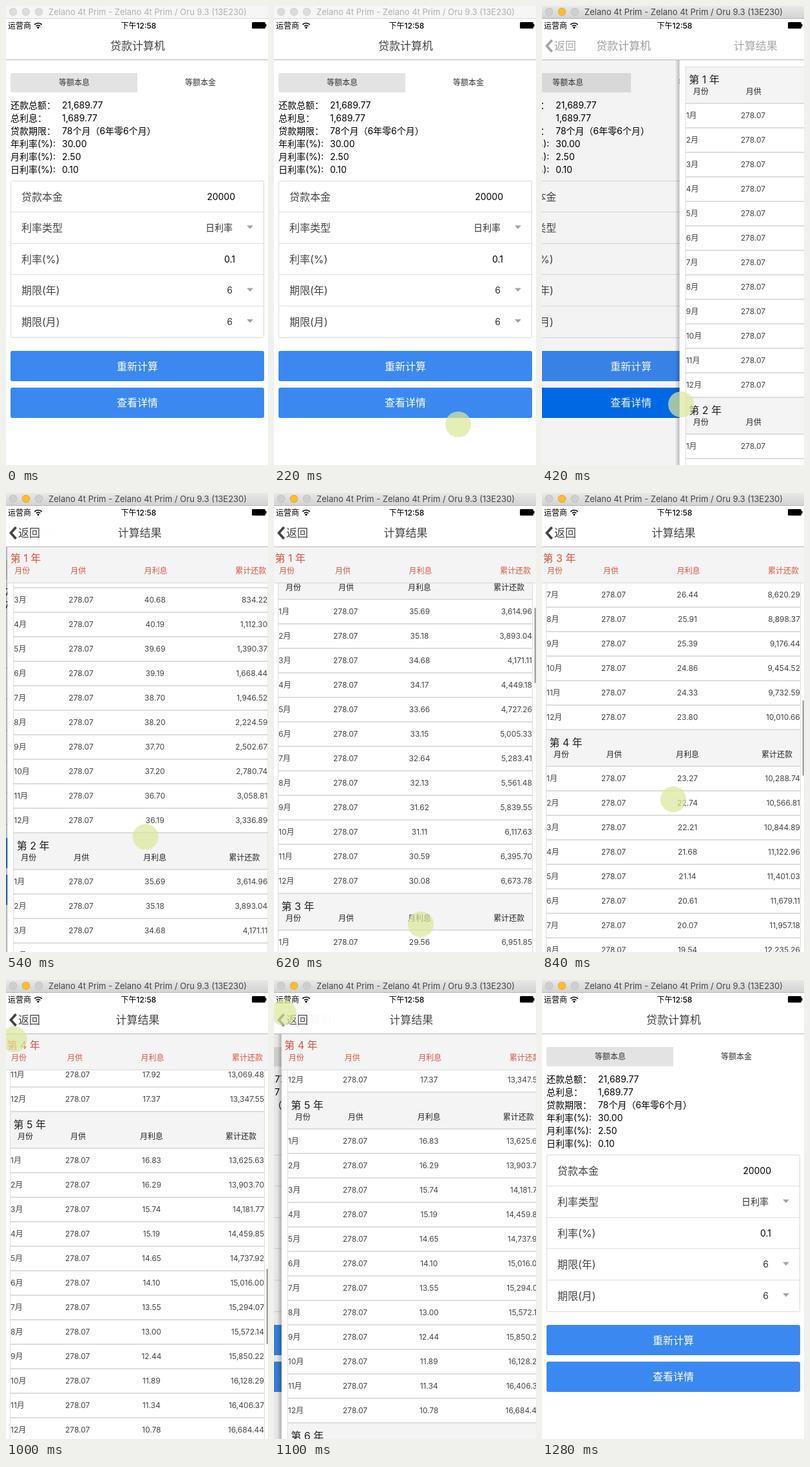
These frames come from a looping animation (407x712 px, 1.3 s). An HTML page with a canvas:

```html
<!DOCTYPE html>
<html lang="zh-CN">
<head>
<meta charset="utf-8">
<title>贷款计算机</title>
<style>
html, body { margin: 0; width: 100%; height: 100%; overflow: hidden; background: #fff; }
canvas { display: block; }
</style>
</head>
<body>
<canvas id="stage" width="407" height="712"></canvas>
<script>
const ctx = document.getElementById('stage').getContext('2d');
const W = 407, H = 712, LOOP = 1300, STEP = 20;
const FONT = 'Inter, "Noto Sans CJK SC", "Noto Sans CJK JP", sans-serif';

// The phone is 414 wide and starts 3px left of the stage.
const PHONE_X = -3, PHONE_W = 414, NAV_BOTTOM = 84;
const LIST_TOP = 94, HEAD_H = 57, ROW_H = 38, YEAR_H = HEAD_H + 12 * ROW_H;
const INK = '#444', LINE = '#ddd', RED = '#df5340';

const MONTHS = 78, RATE = 0.025 / 12;
const payment = 20000 * RATE / (1 - (1 + RATE) ** -MONTHS);
const interest = n => payment * (1 - (1 + RATE) ** (n - 1 - MONTHS));
const money = v => v.toFixed(2).replace(/\B(?=(\d{3})+\.)/g, ',');

// Tracks are lists of [time, value, ...].
const SCROLL = [[510, 0], [540, 80], [580, 310], [620, 499], [650, 600], [690, 850],
  [720, 1000], [760, 1098], [800, 1162], [840, 1266], [880, 1500], [920, 1720],
  [960, 1865], [1000, 1942], [1040, 1966], [1080, 1972]];
const CURSOR = [[40, 430, 735], [200, 300, 655], [320, 217, 619], [420, 216, 618],
  [500, 222, 640], [560, 214, 480], [620, 228, 669], [690, 212, 500], [740, 215, 638],
  [760, 215, 638], [800, 211, 577], [840, 204, 475], [880, 170, 340], [940, 75, 180],
  [1000, 13, 92], [1040, 18, 64], [1090, 17, 60], [1130, 8, 22], [1180, -25, -25]];

function sample(track, t) {
  const last = track[track.length - 1];
  if (t <= track[0][0]) return track[0].slice(1);
  if (t >= last[0]) return last.slice(1);
  const i = track.findIndex(k => k[0] > t), a = track[i - 1], b = track[i];
  const u = (t - a[0]) / (b[0] - a[0]);
  return a.slice(1).map((v, j) => v + (b[j + 1] - v) * u);
}

function settle(ms) {
  const curve = x => 1 - Math.exp(-x * 0.029) * (1 + x * 0.029);
  return curve(Math.max(0, Math.min(190, ms))) / curve(190);
}

function rect(x, y, w, h, color, radius = 0) {
  ctx.fillStyle = color;
  ctx.beginPath();
  ctx.roundRect(x, y, w, h, radius);
  ctx.fill();
}

function disc(x, y, r, color) {
  ctx.fillStyle = color;
  ctx.beginPath();
  ctx.arc(x, y, r, 0, 2 * Math.PI);
  ctx.fill();
}

// y is the middle of the glyphs.
function text(str, x, y, size, color = INK, align = 'left', weight = 400) {
  ctx.font = `${weight} ${size}px ${FONT}`;
  ctx.fillStyle = color;
  ctx.textAlign = align;
  ctx.fillText(str, x, y + size * 0.37);
}

function layer(alpha, dx, draw) {
  ctx.save();
  ctx.globalAlpha = alpha;
  ctx.translate(dx, 0);
  draw();
  ctx.restore();
}

function drawWindowBar(active) {
  const bar = ctx.createLinearGradient(0, 0, 0, 20);
  bar.addColorStop(0, active ? '#e8e8e8' : '#f6f6f6');
  bar.addColorStop(1, active ? '#d2d2d2' : '#f6f6f6');
  rect(0, 0, W, 20, bar);
  rect(0, 19, W, 1, active ? '#b8b8b8' : '#dadada');
  [11, 31, 51].forEach((x, i) => {
    const lit = active && i === 1;
    disc(x, 9, 6.2, lit ? '#e0a12c' : active ? '#bdbdbd' : '#d0d0d0');
    disc(x, 9, 5.5, lit ? '#fdbc2f' : active ? '#cfcfcf' : '#dcdcdc');
  });
  text('Zelano 4t Prim - Zelano 4t Prim / Oru 9.3 (13E230)', 66, 9.5, 13,
    active ? '#444' : '#b0b0b0');
}

function drawStatusBar() {
  rect(0, 20, W, 22, '#fff');
  text('运营商', 3, 30.5, 12, '#000');
  text('下午12:58', 206, 30.5, 12, '#000', 'center', 500);
  ctx.strokeStyle = '#000';
  ctx.lineWidth = 1.7;
  for (const r of [4.5, 8]) {
    ctx.beginPath();
    ctx.arc(50, 34.5, r, -Math.PI * 0.75, -Math.PI * 0.25);
    ctx.stroke();
  }
  disc(50, 33.5, 1.6, '#000');
  rect(382, 25, 21, 10, '#000', 1.5);
  rect(403, 28, 1.5, 4, '#000');
}

function drawNav(p) {
  rect(0, 42, W, 42, '#fff');
  layer(1 - p, -163 * p, () => text('贷款计算机', 204.5, 62, 17, INK, 'center'));
  layer(p, 243 * (1 - p), () => text('计算结果', 204.5, 62, 17, INK, 'center'));
  layer(p, 0, () => {
    ctx.strokeStyle = INK;
    ctx.lineWidth = 3.8;
    ctx.beginPath();
    ctx.moveTo(15.5, 53);
    ctx.lineTo(7.5, 62);
    ctx.lineTo(15.5, 71);
    ctx.stroke();
    text('返回', 19, 62, 17);
  });
  rect(0, 83, W, 1, '#b4b4b4');
}

function drawForm(pressed) {
  rect(PHONE_X, NAV_BOTTOM, PHONE_W, H, '#fff');
  rect(7, 104, 197, 30, '#e3e3e3', [3, 0, 0, 3]);
  text('等额本息', 106, 119, 12, '#333', 'center');
  text('等额本金', 302, 119, 12, '#333', 'center');

  [['还款总额：', '21,689.77'], ['总利息：', '1,689.77'], ['贷款期限：', '78个月（6年零6个月）'],
    ['年利率(%):', '30.00'], ['月利率(%):', '2.50'], ['日利率(%):', '0.10']
  ].forEach(([label, value], i) => {
    text(label, 7, 154 + 20 * i, 14, '#000');
    text(value, 87, 154 + 20 * i, 14, '#000');
  });

  ctx.strokeStyle = '#dadada';
  ctx.lineWidth = 1;
  ctx.beginPath();
  ctx.roundRect(7.5, 271.5, 393, 243, 2);
  ctx.stroke();
  [['贷款本金', '20000'], ['利率类型', '日利率', true], ['利率(%)', '0.1'],
    ['期限(年)', '6', true], ['期限(月)', '6', true]
  ].forEach(([label, value, menu], i) => {
    const y = 296 + 48.5 * i;
    if (i) rect(8, Math.floor(y - 25), 392, 1, LINE);
    text(label, 24, y, 16);
    text(value, menu ? 352 : 356, y - 0.5, 14, menu ? '#333' : '#000', 'right');
    if (!menu) return;
    ctx.fillStyle = '#a3a3a3';
    ctx.beginPath();
    ctx.moveTo(374, y - 4);
    ctx.lineTo(384, y - 4);
    ctx.lineTo(379, y + 1.5);
    ctx.fill();
  });

  rect(7, 535, 394, 47, '#3b88f1', 3);
  text('重新计算', 204, 559, 16, '#fff', 'center');
  rect(7, 592, 394, 47, pressed ? '#006ded' : '#3b88f1', 3);
  text('查看详情', 204, 615, 16, '#fff', 'center');
}

function drawHeading(year, x, y, labelX, labelY, color) {
  text(`第 ${year} 年`, x, y, 16, color);
  ['月份', '月供', '月利息', '累计还款'].forEach((label, i) =>
    text(label, labelX[i], labelY, 12, color));
}

function drawYear(year, top) {
  const first = 12 * (year - 1) + 1;
  const count = Math.min(12, MONTHS - first + 1);
  const height = HEAD_H + count * ROW_H;
  if (top > H || top + height < NAV_BOTTOM) return;
  rect(6, top, 396, HEAD_H, '#f4f4f4');
  rect(6, top, 396, 1, LINE);
  drawHeading(year, 11.5, top + 20, [18, 100, 208, 341], top + 39, '#222');
  for (let i = 0; i < count; i++) {
    const n = first + i, y = top + HEAD_H + i * ROW_H;
    rect(6, y - 1, 396, 2, LINE);
    text(`${i + 1}月`, 7, y + 19, 12);
    text(money(payment), 92, y + 19, 12);
    text(money(interest(n)), 226, y + 19, 12, INK, 'center');
    text(money(payment * n), 401, y + 19, 12, INK, 'right');
  }
  rect(6, top + height - 1, 396, 2, LINE);
  rect(6, top, 1, height, LINE);
  rect(401, top, 1, height, LINE);
}

function drawResults(scroll, showBar) {
  rect(PHONE_X, NAV_BOTTOM, PHONE_W, H, '#fff');
  for (let year = 1; year <= 7; year++) {
    drawYear(year, LIST_TOP + (year - 1) * YEAR_H - Math.round(scroll));
  }
  if (scroll >= 10) {
    rect(PHONE_X, NAV_BOTTOM, PHONE_W, 55, '#f4f4f4');
    rect(PHONE_X, 139, PHONE_W, 1, '#d6d6d6');
    const year = 1 + Math.floor((scroll - 10) / YEAR_H);
    drawHeading(year, 1.5, 101.5, [8, 95, 209.5, 351], 121, RED);
  }
  if (showBar) rect(404.5, 84.8 + 0.187 * scroll, 2.5, 117, '#a4a4a4', 1.2);
}

function drawPages(t, p) {
  const [scroll] = sample(SCROLL, t);
  const x = (1 - p) * PHONE_W;
  ctx.save();
  ctx.beginPath();
  ctx.rect(0, NAV_BOTTOM, W, H - NAV_BOTTOM);
  ctx.clip();
  if (p < 1) {
    layer(1, -p * PHONE_W / 3, () => drawForm(t >= 340 && t < 500));
    rect(0, NAV_BOTTOM, W, H, `rgba(0,0,0,${0.1 * p})`);
  }
  if (p > 0) {
    const edge = x + PHONE_X;
    const shade = ctx.createLinearGradient(edge - 7, 0, edge, 0);
    shade.addColorStop(0, 'rgba(0,0,0,0)');
    shade.addColorStop(1, 'rgba(0,0,0,.25)');
    rect(edge - 7, NAV_BOTTOM, 7, H, shade);
    layer(1, x, () => drawResults(scroll, scroll > 0 && t < 1070));
  }
  ctx.restore();
}

function draw(t) {
  const p = settle(t - 366) * (1 - settle(t - 1090));
  rect(0, 0, W, H, '#fff');
  drawPages(t, p);
  drawNav(p);
  drawStatusBar();
  drawWindowBar(t >= 300);
  const [x, y] = sample(CURSOR, t);
  disc(x, y, 20, 'rgba(220,232,155,.72)');
}

function tick(now) {
  draw(Math.floor((now % LOOP) / STEP) * STEP);
  requestAnimationFrame(tick);
}
requestAnimationFrame(tick);
</script>
</body>
</html>
```
